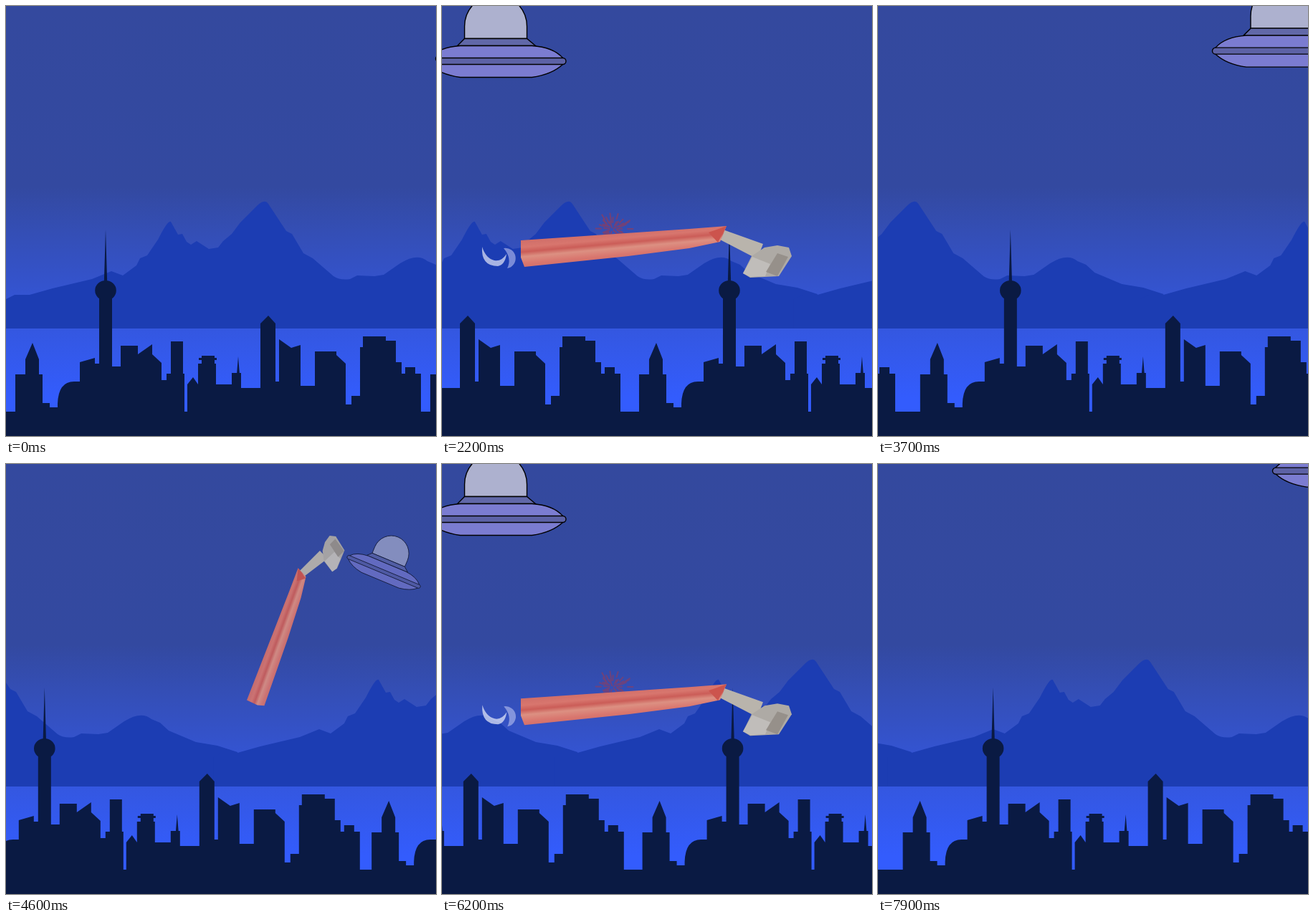
An HTML page with a canvas that plays this animation: 600x600 px, repeating every 8 s.

```html
<!DOCTYPE html>
<html lang="en">
<head>
<meta charset="utf-8">
<title>Night visitor</title>
<style>
html, body { margin: 0; width: 100%; height: 100%; overflow: hidden; background: #34499e; }
canvas { display: block; width: 600px; height: 600px; }
</style>
</head>
<body>
<canvas id="stage" width="600" height="600"></canvas>
<script>
const LOOP = 8000, CYCLE = 4032, STEP = 100;
const NIGHT = '#0a1a43', RIDGE = '#1c3db3', LINE = '#000';

let c = document.getElementById('stage').getContext('2d');
const layer = document.createElement('canvas');
layer.width = layer.height = 600;
const layerContext = layer.getContext('2d');

// Progress from 0 to 1 between two times
const step = (t, from, to) => Math.min(1, Math.max(0, (t - from) / (to - from)));

function gradient(x1, y1, x2, y2, stops) {
  const g = c.createLinearGradient(x1, y1, x2, y2);
  for (const [at, color] of stops) g.addColorStop(at, color);
  return g;
}

const sky = gradient(0, 0, 0, 600, [
  [0, '#34499e'], [.42, '#3349a0'], [.52, '#344eb4'], [.75, '#3457e0'], [.91, '#335cfd']
]);

const mountains = new Path2D(`M0 450V409L12 403 33 403 65 394 120 381 147 370 163 376 182 362 187 352 197 348
  212 326Q226 298 230 301L240 319 246 318 252 329 258 333 266 328 283 339 296 337 303 328 315 318 327 302
  350 279Q361 268 366 276L391 314 399 318 415 345 428 352 457 377Q466 383 480 381L490 376 514 377 527 375
  550 359Q574 344 588 356L600 361 612 372 650 388 680 393 708 402V450Z`);

// Each block: left, width, roof height at the left, roof height at the right if it slopes
const blocks = [
  [13, 38, 514], [27, 10, 493, 470], [37, 9, 470, 493], [51, 10, 554], [61, 11, 560], [95, 9, 524],
  [103, 21, 497, 491], [124, 24, 499], [130, 18, 397], [148, 12, 503], [160, 24, 474], [184, 20, 486, 472],
  [204, 13, 486, 498], [217, 7, 522], [224, 25, 513], [230, 17, 468], [253, 8, 528, 518], [261, 7, 518, 528],
  [268, 25, 499], [273, 18, 488], [293, 35, 528], [315, 13, 512], [328, 27, 533], [355, 11, 443, 432],
  [366, 10, 432, 443], [376, 5, 524], [381, 17, 465, 477], [398, 13, 477, 473], [411, 20, 530], [431, 30, 482],
  [461, 13, 487, 499], [474, 8, 556], [482, 12, 544], [494, 50, 476], [498, 32, 461], [530, 14, 467],
  [544, 8, 497], [552, 27, 513], [557, 14, 504]
];
const city = new Path2D();
for (const [x, w, left, right = left] of blocks)
  city.addPath(new Path2D(`M${x} 600V${left}L${x + w} ${right}V600Z`));
city.addPath(new Path2D('M136.800 386L139 312 141.200 386ZM322 514L324 489 326 514ZM269 491H294V494H269Z'));
city.addPath(new Path2D('M72 600V555Q73 524 95 524V600Z'));
city.ellipse(139, 397, 14.8, 14, 0, 0, Math.PI * 2);

function shape(d, fill, stroke) {
  const path = new Path2D(d);
  c.fillStyle = fill;
  c.fill(path);
  if (!stroke) return;
  c.strokeStyle = stroke;
  c.lineWidth = 1.4;
  c.stroke(path);
}

function tile(path, x, color) {
  c.save();
  c.translate(x, 0);
  c.fillStyle = color;
  c.fill(path);
  c.restore();
}

// Draws on a separate layer so that overlapping parts fade as one
function sprite(draw, { x, y, scale = 1, turn = 0, alpha }) {
  if (alpha <= 0) return;
  const screen = c;
  c = layerContext;
  c.clearRect(0, 0, 600, 600);
  c.save();
  c.translate(x, y);
  c.rotate(turn * Math.PI / 180);
  c.scale(scale, scale);
  draw();
  c.restore();
  c = screen;
  c.globalAlpha = alpha;
  c.drawImage(layer, 0, 0);
  c.globalAlpha = 1;
}

function ufo() {
  shape('M-44 -31V-48A43.500 44 0 0 1 43 -48V-31Z', '#adb1cf', LINE);
  shape('M-44 -31H43L55 -21H-54Z', '#6168a8', LINE);
  shape('M-93 -4Q-80 -19 -50 -21H50Q80 -19 93 -4V5Q78 19 50 23H-50Q-78 19 -93 5Z', '#7b7cd1', LINE);
  shape('M-93 -4H93A4.500 4.500 0 0 1 93 5H-93A4.500 4.500 0 0 1 -93 -4Z', '#5d62a6', LINE);
}

function razor() {
  shape('M92 -31L148 -11 140 10 86 -18Z', '#b9b4ac');
  shape('M120 30L132 6 150 -6 168 -9 184 -6 188 6 170 34 130 36Z', '#aeaaa5');
  shape('M120 30L133 7 158 17 151 34 130 35Z', '#c0bdba');
  shape('M152 28L168 2 183 7 168 34Z', '#96908a');
  const plastic = gradient(-72, -28, -68, 16, [
    [0, '#cf6d68'], [.25, '#d8766e'], [.4, '#cb5d58'], [.55, '#dc9082'], [.75, '#d9776f'], [1, '#cd6a66']
  ]);
  shape('M-190 -16L45 -32 97 -36 88 -14 45 -5 -40 6 -185 21 -190 8Z', plastic);
  shape('M72 -27L97 -36 85 -13Z', '#cc544d');
}

function splash() {
  let seed = 7;
  const random = () => (seed = seed * 16807 % 2147483647) / 2147483647;
  c.strokeStyle = '#9c3a52';
  c.lineWidth = 2;
  c.beginPath();
  for (let i = 0; i < 45; i++) {
    const a = random() * Math.PI * 2, r = random() * 22;
    c.moveTo(Math.cos(a) * r, Math.sin(a) * r * .7);
    c.lineTo(Math.cos(a) * (r + 9), Math.sin(a) * (r + 9) * .8);
  }
  c.stroke();
}

function puff() {
  shape('M8 -12A14 14 0 1 1 13 16Q20 2 8 -12Z', '#a9b3ea');
  shape('M-22 -14Q-24 13 0 13Q10 11 12 -4Q5 7 -5 5Q-17 2 -22 -14Z', '#eef0fc');
}

function beam(x, y, alpha) {
  c.save();
  c.globalAlpha = alpha;
  c.globalCompositeOperation = 'multiply';
  c.translate(x, y);
  shape('M-12 20H15L246 488H-249Z', '#ffff6c');
  c.restore();
}

// Shrinks away, swings back close, hovers, then leaves
function ufoPose(p) {
  const out = step(p, 0, 1367) ** .83, back = Math.sqrt(step(p, 1367, 2150));
  const go = step(p, 2200, 2750), leave = step(p, 3242, 4033);
  const far = step(p, 0, 800) - back * (p > 1367);
  return {
    x: 697 - 352 * out - 269.5 * back + 259.5 * go + 395.5 * leave,
    y: 73 + 160 * out - 156.5 * back + 57.5 * go - 189 * leave ** 1.77,
    scale: 1 - .61 * far,
    turn: 71 * step(p, 193, 1367) * (1 - back),
    alpha: 1 - .48 * far
  };
}

// Swoops in, rocks, then is pulled up the beam
function razorPose(p) {
  const away = 1 - step(p, 200, 1000), lift = step(p, 2700, 3400), pull = lift ** 1.7;
  return {
    x: 300 + 188 * away + 70 * lift,
    y: 350 - 248 * away - 7 * step(p, 1367, 2200) - 186 * pull,
    scale: 1 - .58 * away - .98 * pull,
    turn: 107 * lift - 120 * away,
    alpha: lift < 1 ? Math.min(1, 2 - 2 * away) - .4 * pull : 0
  };
}

function puffPose(p) {
  const sway = step(p, 1367, 2200);
  return {
    x: 85 - 7 * sway,
    y: 359 - 9 * sway + 44 * step(p, 2700, 3400),
    alpha: .8 * step(p, 1000, 1367) * (1 - step(p, 2000, 3200))
  };
}

function render(t) {
  const p = t % CYCLE;
  c.fillStyle = sky;
  c.fillRect(0, 0, 600, 600);

  const ridge = -.0837 * t;
  tile(mountains, ridge, RIDGE);
  tile(mountains, ridge + 675, RIDGE);

  // The two halves of the skyline drift at slightly different speeds
  tile(city, -.15 * p, NIGHT);
  tile(city, 579 - .1441 * p, NIGHT);
  c.fillStyle = NIGHT;
  c.fillRect(0, 566, 600, 34);

  sprite(splash, { x: 238, y: 311, alpha: .6 * (1 - Math.abs(p - 2200) / 300) });
  sprite(puff, puffPose(p));
  sprite(razor, razorPose(p));

  const ship = ufoPose(p);
  beam(ship.x, ship.y, step(p, 2700, 2850) * (1 - step(p, 3350, 3650)));
  sprite(ufo, ship);
}

const start = performance.now();
function frame() {
  const t = (performance.now() - start) % LOOP;
  render(Math.floor(t / STEP) * STEP);
  requestAnimationFrame(frame);
}
frame();
</script>
</body>
</html>
```
